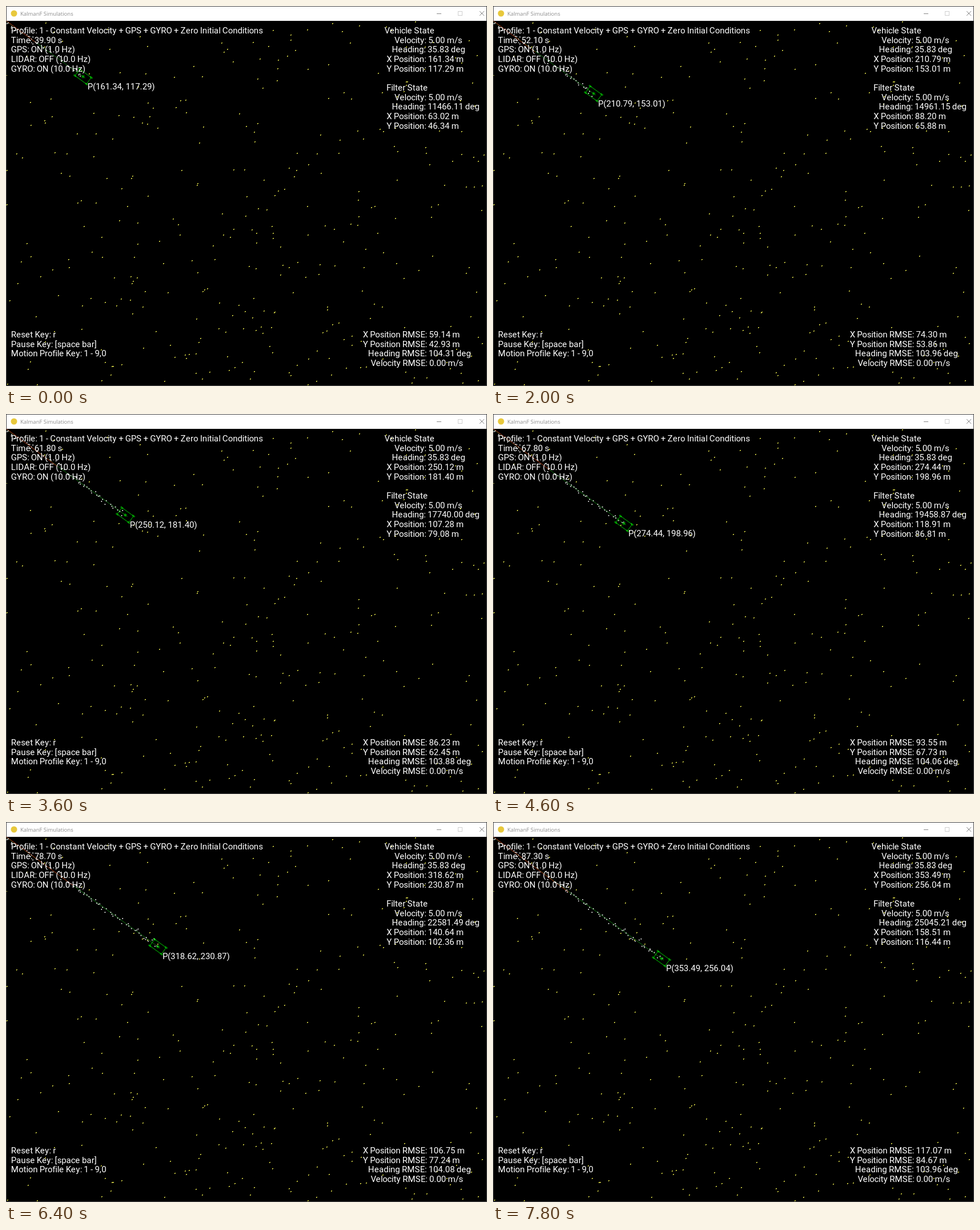
An HTML page with a canvas that plays this animation: 842x665 px, repeating every 8 s.

```html
<!DOCTYPE html>
<html lang="en">
<head>
<meta charset="utf-8">
<title>KalmanF Simulations</title>
<style>
  html, body { margin: 0; width: 100%; height: 100%; overflow: hidden; background: #000; }
  canvas { display: block; }
</style>
</head>
<body>
<canvas id="stage" width="842" height="665"></canvas>
<script>
const ctx = document.getElementById('stage').getContext('2d');
const WIDTH = 842, HEIGHT = 665, BAR = 25;
const LOOP = 8000, STEP = 200;
const SCALE = 5 / 6, ORIGIN_X = 0.5, ORIGIN_Y = 25.8;
const HEADING = 35.83 * Math.PI / 180;
const START_TIME = 39.9;
const LINE = 20;

function randomizer(seed) {
  return () => {
    seed = (seed * 1664525 + 1013904223) >>> 0;
    return seed / 4294967296;
  };
}

const scatter = randomizer(77);
const stars = Array.from({ length: 360 }, () => [
  Math.floor(scatter() * WIDTH),
  Math.floor(BAR + 2 + scatter() * (HEIGHT - BAR - 4))
]);

const truth = time => [4.05375 * (time - 0.1), 2.9272 * (time - 0.1) + 0.7918];

const jitter = randomizer(9);
const noise = () => (jitter() + jitter() + jitter() - 1.5) * 6.5;
const fixes = Array.from({ length: 88 }, (_, second) => {
  const [x, y] = truth(second);
  return [x + noise(), y + noise()];
});

// Each step covers about 1.2 simulated seconds, with a slight drift in pace.
function timeAt(step) {
  const time = START_TIME + 1.2154 * step + 0.08 * Math.sin(step * Math.PI / 20);
  return Math.round(time * 10) / 10;
}

function filterAt(time) {
  const elapsed = time - START_TIME;
  const sway = Math.sin(elapsed * 2 * Math.PI / 47.4);
  return {
    x: 63.02 + 2.0145 * elapsed + 0.6 * sway,
    y: 46.34 + 1.4789 * elapsed + 1.5 * sway,
    heading: 5 * time * 180 / Math.PI + 35.6,
    errorX: 59.14 + 1.24932 * elapsed - 0.000573 * elapsed ** 2,
    errorY: 42.93 + 0.90077 * elapsed - 0.000426 * elapsed ** 2,
    errorHeading: 104.02 + 0.35 * Math.exp(-elapsed / 30) * Math.cos(elapsed * 0.2 - 0.6)
  };
}

function line(color, ...points) {
  ctx.strokeStyle = color;
  ctx.beginPath();
  for (const [x, y] of points) ctx.lineTo(x, y);
  ctx.stroke();
}

// Glyph advances snap to whole scene pixels.
function text(string, x, y) {
  for (const char of string) {
    ctx.fillText(char, x, y);
    x += Math.round(ctx.measureText(char).width);
  }
}

function column(y, rows) {
  rows.forEach(([x, string], i) => text(string, x, y + i * LINE));
}

function drawWindow() {
  ctx.lineWidth = 1;
  ctx.strokeStyle = '#484848';
  ctx.strokeRect(0.5, 0.5, WIDTH - 1, HEIGHT - 1);
  ctx.fillStyle = '#fff';
  ctx.fillRect(1, 1, WIDTH - 2, BAR);
  ctx.fillStyle = '#e8c83c';
  ctx.beginPath();
  ctx.arc(14, 13, 5.5, 0, 7);
  ctx.fill();
  ctx.fillStyle = '#8c8c8c';
  ctx.font = '9.5px "Open Sans", sans-serif';
  ctx.fillText('KalmanF Simulations', 25, 16.5);
  line('#888', [754, 13.5], [762, 13.5]);
  ctx.strokeStyle = '#d0d0d0';
  ctx.strokeRect(791.5, 9.5, 7, 7);
  line('#888', [829, 9], [837, 17]);
  line('#888', [837, 9], [829, 17]);
}

function drawStars() {
  ctx.fillStyle = '#e8e84c';
  for (const [x, y] of stars) {
    ctx.fillRect(x, y, 1, 2);
    ctx.fillRect(x + 1, y, 1, 1);
  }
}

function drawVehicle(x, y) {
  const green = '#00d800';
  ctx.save();
  ctx.translate(x, y);
  ctx.rotate(HEADING);
  ctx.strokeStyle = green;
  ctx.strokeRect(-15, -8.5, 30, 17);
  for (const wheelX of [-15, 15]) {
    for (const wheelY of [-8.5, 8.5]) ctx.strokeRect(wheelX - 2.5, wheelY - 1, 5, 2);
  }
  line(green, [-4, 0], [5, 0]);
  line(green, [-2, -3], [2, 3]);
  line(green, [2, -3], [-2, 3]);
  ctx.restore();
}

function drawReadouts(time, x, y, filter) {
  const show = value => value.toFixed(2);
  ctx.fillStyle = '#fff';
  ctx.font = '18px Roboto, sans-serif';
  text(`P(${show(x)}, ${show(y)})`, x + 9.5, y + 26.7);
  column(26.6, [
    [10, 'Profile: 1 - Constant Velocity + GPS + GYRO + Zero Initial Conditions'],
    [10, `Time: ${show(time)} s`],
    [10, 'GPS: ON (1.0 Hz)'],
    [10, 'LIDAR: OFF (10.0 Hz)'],
    [10, 'GYRO: ON (10.0 Hz)']
  ]);
  column(26.6, [
    [794.5, 'Vehicle State'],
    [815.5, 'Velocity: 5.00 m/s'],
    [810, 'Heading: 35.83 deg'],
    [799, `X Position: ${show(x)} m`],
    [799, `Y Position: ${show(y)} m`],
    [0, ''],
    [798.5, 'Filter State'],
    [815.5, 'Velocity: 5.00 m/s'],
    [810, `Heading: ${show(filter.heading)} deg`],
    [799, `X Position: ${show(filter.x)} m`],
    [799, `Y Position: ${show(filter.y)} m`]
  ]);
  column(665, [
    [10, 'Reset Key: r'],
    [10, 'Pause Key: [space bar]'],
    [10, 'Motion Profile Key: 1 - 9,0']
  ]);
  column(665, [
    [749, `X Position RMSE: ${show(filter.errorX)} m`],
    [749, `Y Position RMSE: ${show(filter.errorY)} m`],
    [760, `Heading RMSE: ${show(filter.errorHeading)} deg`],
    [765.5, 'Velocity RMSE: 0.00 m/s']
  ]);
}

function draw(step) {
  const time = timeAt(step);
  const filter = filterAt(time);
  const [x, y] = truth(time);

  ctx.fillStyle = '#000';
  ctx.fillRect(0, 0, WIDTH, HEIGHT);
  drawStars();

  ctx.save();
  ctx.translate(ORIGIN_X, ORIGIN_Y);
  ctx.scale(SCALE, SCALE);
  ctx.lineWidth = 1;
  line('#148a14', [0, 0.8], [x, y]);
  line('#c81414', [0, 0], [filter.x, filter.y]);
  ctx.fillStyle = '#fff';
  fixes.forEach(([fixX, fixY], second) => {
    if (second <= time) ctx.fillRect(fixX - 1, fixY - 1, 2, 2);
  });
  drawVehicle(x, y);
  drawReadouts(time, x, y, filter);
  ctx.restore();

  drawWindow();
}

const start = performance.now();
function frame() {
  draw(Math.floor(((performance.now() - start) % LOOP) / STEP));
  requestAnimationFrame(frame);
}
frame();
</script>
</body>
</html>
```
